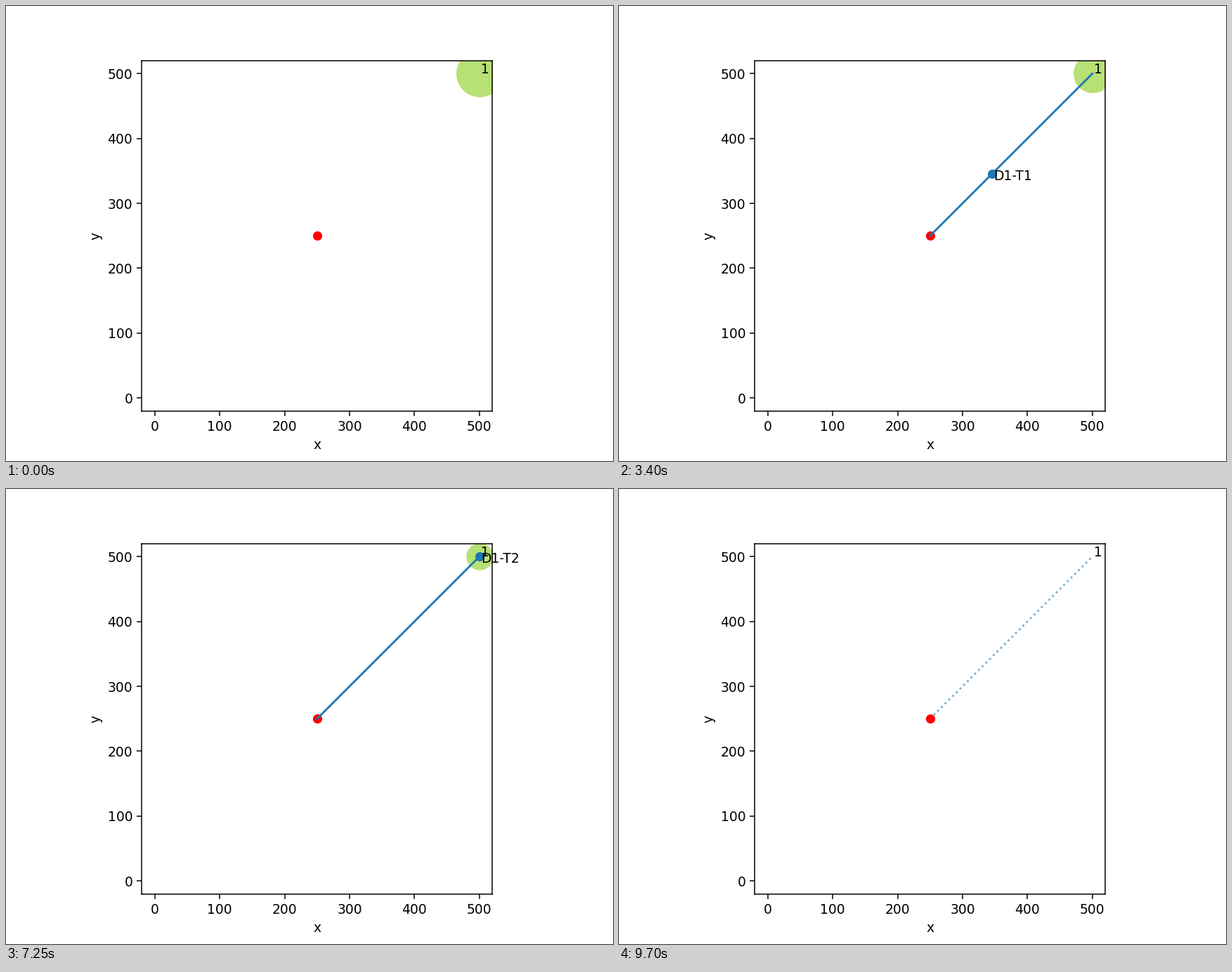
Write a matplotlib script that moves like this. It is 864 px wide and 648 px high and loops after 10 s.

```python
import math

import matplotlib.pyplot as plt
from matplotlib.animation import FuncAnimation

FRAMES, INTERVAL = 200, 50
HOME, TREE = 250, 500
FRUITS, AREA_PER_FRUIT = 60, 20
SPEED = 8.43                      # units per frame along each axis
FLIGHT = (TREE - HOME) / SPEED

# take-off frame, frame of leaving the tree, fruits picked, label
TRIPS = [(0.0, 49.66, 20, "D1-T1"),
         (94.44, 164.32, 40, "D1-T2")]

fig, ax = plt.subplots(figsize=(6.4, 4.8), dpi=135)
ax.set(xlim=(-20, 520), ylim=(-20, 520), aspect="equal", xlabel="x", ylabel="y")

tree = ax.scatter([TREE], [TREE], s=FRUITS * AREA_PER_FRUIT, color="#b7e075")
drone = ax.scatter([HOME], [HOME], color="tab:blue")
ax.scatter([HOME], [HOME], color="red")
ax.text(TREE + 2, TREE, "1")
route, = ax.plot([], [], color="tab:blue")
label = ax.text(HOME, HOME, "")
trails = [ax.plot([HOME, TREE], [HOME, TREE], ":", color="tab:blue",
                  alpha=0.35, zorder=0)[0] for _ in TRIPS]


def clamp(v, lo, hi):
    return max(lo, min(hi, v))


def update(k):
    left = FRUITS
    flying = False
    for (start, leave, load, name), trail in zip(TRIPS, trails):
        left -= clamp(math.ceil(k - start - FLIGHT), 0, load)
        trail.set_visible(k >= leave + FLIGHT)
        if start < k < leave + FLIGHT:
            flying = True
            if k <= leave:
                pos = min(TREE, HOME + SPEED * (k - start))
                end = pos
            else:
                pos = TREE - SPEED * (k - leave)
                end = TREE
            drone.set_offsets([[pos, pos]])
            route.set_data([HOME, end], [HOME, end])
            label.set_position((pos + 2, pos - 10))
            label.set_text(name)

    tree.set_sizes([left * AREA_PER_FRUIT])
    tree.set_visible(left > 0)
    for artist in (drone, route, label):
        artist.set_visible(flying)
    return tree, drone, route, label, *trails


anim = FuncAnimation(fig, update, frames=FRUITS and FRAMES, interval=INTERVAL,
                     init_func=lambda: update(0), repeat=True, repeat_delay=0)
plt.show()
```
